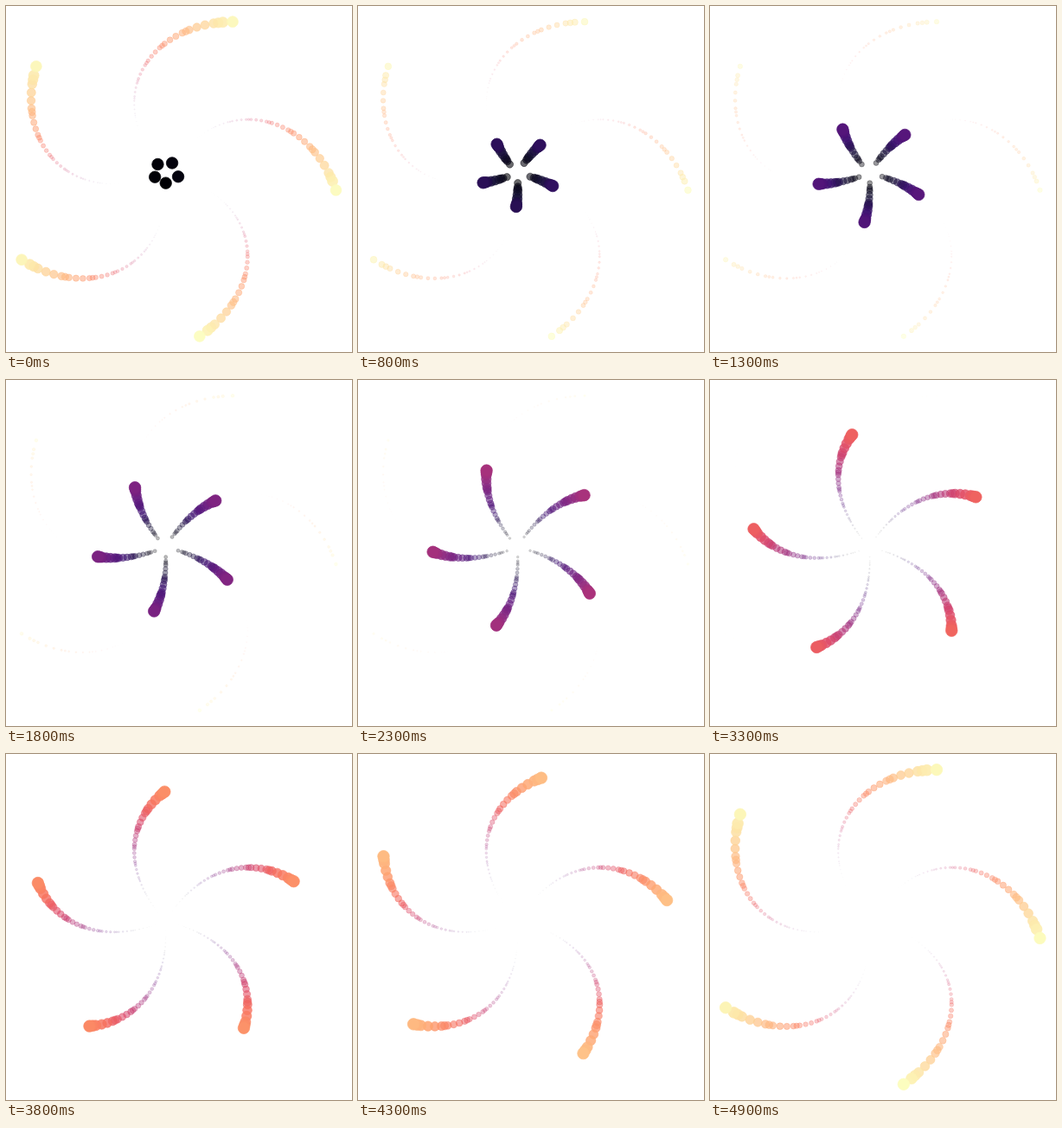
Recreate the animation shown at these times as an HTML page with a canvas. Size 400 by 400 pixels, loop 5000 ms.

```html
<!DOCTYPE html>
<html>
<head>
<meta charset="utf-8">
<title>Spiral</title>
<style>
html, body { margin: 0; width: 100%; height: 100%; overflow: hidden; background: #fff; }
canvas { display: block; width: 400px; height: 400px; }
</style>
</head>
<body>
<canvas id="stage" width="400" height="400"></canvas>
<script>
const ctx = document.getElementById('stage').getContext('2d');
const STEPS = 50, STEP_MS = 100, KEYS = 39, ARMS = 5;
const PALETTE = ['000004', '140e36', '3b0f70', '641a80', '8c2981', 'b63679',
                 'de4968', 'f76f5c', 'fe9f6d', 'fece91', 'fcfdbf']
  .map(h => [0, 2, 4].map(i => parseInt(h.slice(i, i + 2), 16)));

const mix = (a, b, t) => a + (b - a) * t;

function colour(t) {
  const p = Math.min(t, 1) * (PALETTE.length - 1);
  const i = Math.min(Math.floor(p), PALETTE.length - 2);
  return `rgb(${PALETTE[i].map((c, n) => Math.round(mix(c, PALETTE[i + 1][n], p - i)))})`;
}

// Point of an arm at a whole key: radius grows evenly, the turn speeds up
function keyPoint(key, arm) {
  const q = key + 2.5 + arm / ARMS;
  const angle = (131.16 + 144 - 72 * arm - 0.77 * q - 0.000437 * q ** 3) * Math.PI / 180;
  const r = q / 41.9;
  return [184.05 + 197.5 * r * Math.cos(angle), 193.3 - 190.6 * r * Math.sin(angle)];
}

// Keys fall on whole steps, so some gaps take one step and some take two
const keyStep = k => Math.round(k * (STEPS - 1) / KEYS);

function dotsAt(step) {
  let k = 0;
  while (k < KEYS - 1 && keyStep(k + 1) <= step) k++;
  const t = (step - keyStep(k)) / (keyStep(k + 1) - keyStep(k));
  return Array.from({ length: ARMS }, (_, arm) => {
    const a = keyPoint(k, arm), b = keyPoint(k + 1, arm);
    return {
      x: mix(a[0], b[0], t),
      y: mix(a[1], b[1], t),
      fill: colour(((k + t) * ARMS + arm) / (KEYS * ARMS + ARMS - 1))
    };
  });
}

const path = Array.from({ length: STEPS }, (_, step) => dotsAt(step));

function draw(step) {
  ctx.globalAlpha = 1;
  ctx.fillStyle = '#fff';
  ctx.fillRect(0, 0, 400, 400);
  ctx.lineWidth = 0.71;
  for (let age = STEPS - 1; age >= 0; age--) {
    const fade = (1 - age / STEPS) ** 3;
    ctx.globalAlpha = fade;
    for (const d of path[(step - age + STEPS) % STEPS]) {
      ctx.fillStyle = ctx.strokeStyle = d.fill;
      ctx.beginPath();
      ctx.arc(d.x, d.y, 6.4 * fade + 0.355, 0, 2 * Math.PI);
      ctx.fill();
      ctx.stroke();
    }
  }
}

const start = performance.now();
let shown = -1;
function tick() {
  const step = Math.floor((performance.now() - start) / STEP_MS) % STEPS;
  if (step !== shown) draw(shown = step);
  requestAnimationFrame(tick);
}
tick();
</script>
</body>
</html>
```
